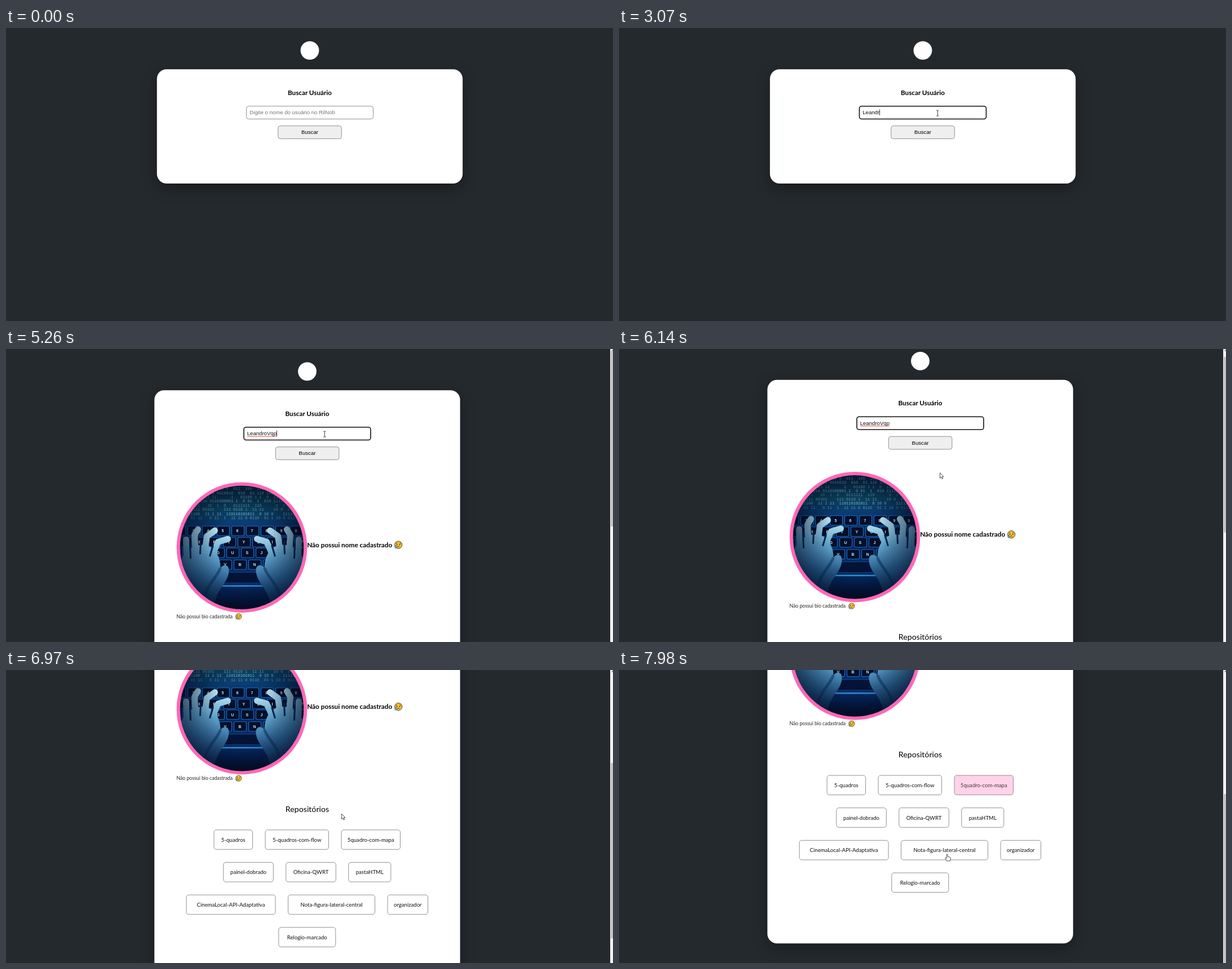
An HTML page that plays this animation: 1077 px wide and 520 px high, repeating every 8000 ms.

```html
<!DOCTYPE html>
<html lang="pt-BR">
<head>
<meta charset="utf-8">
<title>Buscar Usuário</title>
<style>
  html, body { margin: 0; width: 100%; height: 100%; overflow: hidden; background: #24292d; }
  svg { display: block; }
  text { font-family: Lato, "Open Sans", sans-serif; white-space: pre; }
  .ui { font-family: "Liberation Sans", Arial, sans-serif; font-size: 9.62px; }
  .code { font: 7px "Liberation Mono", monospace; fill: #a4e6f5; }
  .key { font: bold 7px "Liberation Sans", sans-serif; fill: #bfe9ff; }
  #card { filter: drop-shadow(0 8px 12px rgba(0, 0, 0, .32)); }
</style>
</head>
<body>
<svg id="stage" width="1077" height="520" viewBox="0 0 1077 520">
  <defs>
    <clipPath id="round"><circle r="110.5"/></clipPath>
    <linearGradient id="night" x2="0" y2="1">
      <stop offset="0" stop-color="#072c42"/><stop offset=".2" stop-color="#0d4a68"/>
      <stop offset=".32" stop-color="#0a3a72"/><stop offset=".5" stop-color="#061f50"/>
      <stop offset=".8" stop-color="#07306f"/><stop offset="1" stop-color="#020a25"/>
    </linearGradient>
    <radialGradient id="edge">
      <stop offset=".45" stop-color="#010a20" stop-opacity="0"/><stop offset="1" stop-color="#010a20" stop-opacity=".6"/>
    </radialGradient>
    <linearGradient id="skin" gradientUnits="userSpaceOnUse" x1="-50" y1="-36" x2="-80" y2="100">
      <stop offset="0" stop-color="#c2ebf6"/><stop offset=".35" stop-color="#5e9fc6"/>
      <stop offset=".65" stop-color="#2f6a9c"/><stop offset="1" stop-color="#0a2c58"/>
    </linearGradient>
    <g id="hand" fill="url(#skin)">
      <path d="M-112 34C-104 4 -84 -8 -62 -4C-46 2 -38 18 -38 36C-28 26 -20 34 -24 48C-28 66 -46 74 -50 108L-100 108Z"/>
      <g stroke="url(#skin)" stroke-width="11" stroke-linecap="round" stroke-linejoin="round" fill="none">
        <path d="M-98 22L-99 -14M-82 10L-84 -22L-78 -32M-66 8L-62 -20L-48 -30M-52 12L-42 -10L-25 -15"/>
      </g>
      <path d="M-91 20L-92 -8M-74 12L-73 -12M-57 16L-51 -4" stroke="#072650" stroke-width="3" fill="none"/>
      <path d="M-38 36C-44 54 -62 64 -66 90" stroke="#0c3768" stroke-width="5" opacity=".6" fill="none"/>
    </g>
  </defs>

  <g id="page">
    <circle cx="539" cy="39.8" r="16.4" fill="#fff"/>
    <rect id="card" x="267.8" y="73.3" width="542.4" rx="17" fill="#fff"/>
    <g id="form">
      <rect id="field" x="426.5" y="138.7" width="225" height="22.8" rx="4" fill="#fff"/>
      <text id="typed" class="ui" x="432.2" y="153.2"></text>
      <path id="spell" d="M432.5 155.2H484.5" stroke="#e8322e" stroke-width=".9"/>
      <path id="caret" d="M0 144.5V155" stroke="#000" stroke-width=".8"/>
      <rect id="button" x="482.8" y="173.7" width="112.6" height="22.8" rx="4" stroke="#858585" stroke-width=".9"/>
    </g>
    <g id="result">
      <g id="photo" transform="translate(423 352.2)"></g>
    </g>
  </g>

  <g id="bar">
    <rect x="1072" width="5" height="520" fill="#f1f1f1"/>
    <path d="M1074 3.5L1077 .5V3.5Z" fill="#777"/>
    <rect id="thumb" x="1073" width="4" height="311.5" fill="#c1c1c1"/>
  </g>
  <g id="mouse" stroke-linejoin="round">
    <path id="arrow" d="M0 0V9.4L2.2 7.4L3.7 10.8L5.1 10.2L3.6 6.9H6.4Z" fill="#fff" stroke="#222" stroke-width=".8"/>
    <path id="beam" d="M-2.2 -4.8H-.6L0 -4.3L.6 -4.8H2.2M0 -4.3V4.5M-2.2 5H-.6L0 4.5L.6 5H2.2" fill="none" stroke="#222" stroke-width=".9"/>
    <path id="pointer" d="M-1 1Q0 -.6 1 1V5L5.2 6Q6.3 6.4 6 8L5 12.6H-.6L-3.6 8.2Q-3.6 6.6 -2.4 7L-1 8.2Z" fill="#fff" stroke="#222" stroke-width=".8"/>
  </g>
</svg>
<script>
const LOOP = 8000, FOUND = 5060, FOCUS = 1130;
const USER = "LeandroVqp", HINT = "Digite o nome do usuário no RilNob";
const KEYS = [2190, 2540, 2620, 2720, 2810, 3070, 3200, 3600, 4000, 4070];
const $ = id => document.getElementById(id);

function add(parent, tag, attrs, text = "") {
  const el = document.createElementNS("http://www.w3.org/2000/svg", tag);
  for (const k in attrs) el.setAttribute(k, attrs[k]);
  el.textContent = text;
  parent.append(el);
  return el;
}
const set = (id, attrs) => { for (const k in attrs) $(id).setAttribute(k, attrs[k]); };
const show = (id, on) => set(id, { visibility: on ? "inherit" : "hidden" });

// y is the middle of the capital letters
const label = (parent, x, y, size, text, attrs = {}) =>
  add(parent, "text", { x, y: y + size * .36, "font-size": size, ...attrs }, text);
const middle = { "text-anchor": "middle" };

function sadFace(x, y, r) {
  const g = add($("result"), "g", { transform: `translate(${x} ${y}) scale(${r / 7})` });
  add(g, "circle", { r: 6.6, fill: "#fcc13b", stroke: "#3a2b14", "stroke-width": .9 });
  add(g, "path", { d: "M-4.4 -2.2L-2 -3.6M4.4 -2.2L2 -3.6M-2.2 3.6Q0 1.4 2.2 3.6",
    fill: "none", stroke: "#3a2b14", "stroke-width": 1 });
  for (const cx of [-2.5, 2.5]) add(g, "circle", { cx, cy: -.4, r: 1, fill: "#3a2b14" });
  add(g, "path", { d: "M-4.6 1Q-8 5.2 -4.6 6.2Q-1.4 5.2 -4.6 1Z", fill: "#5bb8f0", stroke: "#1d4b70", "stroke-width": .7 });
}

function drawPhoto() {
  const photo = $("photo");
  const g = add(photo, "g", { "clip-path": "url(#round)" });
  add(g, "rect", { x: -112, y: -112, width: 224, height: 224, fill: "url(#night)" });
  let seed = 7;
  const rand = () => (seed = seed * 16807 % 2147483647) / 2147483647;
  for (let row = 0; row < 8; row++) {
    let s = "";
    for (let i = 0; i < 54; i++) s += rand() < .38 ? " " : rand() < .5 ? "0" : "1";
    add(g, "text", { class: "code", x: -112, y: -102 + row * 7.4, opacity: .5 + rand() * .4 }, s);
  }
  // Keyboard rows: letters, left edge, top
  const rows = [["234567890D", -122, -38], ["WERTYUIOPA", -111, -18], ["SDFGUSJKLH", -131, 1], ["XCVVBNNMMZ", -118, 22]];
  for (const [line, left, y] of rows) {
    [...line].forEach((c, i) => {
      const x = left + i * 26;
      add(g, "rect", { x, y, width: 22, height: 17, rx: 2.5, fill: "#030f2a", stroke: "#1c6fc0", "stroke-width": 1.1 });
      add(g, "text", { class: "key", x: x + 8, y: y + 11 }, c);
    });
  }
  add(g, "rect", { x: -62, y: 44, width: 124, height: 19, rx: 2, fill: "#041337", stroke: "#0f4f9c" });
  add(g, "rect", { x: -66, y: 67, width: 132, height: 2.5, fill: "#3fa8f5" });
  add(g, "use", { href: "#hand" });
  add(g, "use", { href: "#hand", transform: "translate(2 0) scale(-1 1)" });
  add(g, "circle", { r: 112, fill: "url(#edge)" });
  add(photo, "circle", { r: 112.8, fill: "none", stroke: "#ff69b4", "stroke-width": 6 });
}

// Each row is centred: name and box width
const REPOS = [
  [["5-quadros", 68.5], ["5-quadros-com-flow", 112.5], ["5quadro-com-mapa", 104.5]],
  [["painel-dobrado", 88.5], ["Oficina-QWRT", 88.5], ["pastaHTML", 75]],
  [["CinemaLocal-API-Adaptativa", 158], ["Nota-figura-lateral-central", 154], ["organizador", 71.5]],
  [["Relogio-marcado", 101]]
];
let hotBox, hotText;

function drawPage() {
  label($("page"), 539, 114.4, 11.7, "Buscar Usuário", { ...middle, "font-weight": 700 });
  add($("form"), "text", { class: "ui", x: 539, y: 188, ...middle }, "Buscar");
  drawPhoto();
  const result = $("result");
  label(result, 538.7, 347.6, 11.8, "Não possui nome cadastrado", { "font-weight": 700 });
  sadFace(700.7, 347.6, 7);
  label(result, 307, 474.6, 8.7, "Não possui bio cadastrada", { fill: "#222" });
  sadFace(417.3, 474.6, 5.5);
  label(result, 539, 529.6, 14.2, "Repositórios", middle);
  REPOS.forEach((row, r) => {
    const gap = 22.5, y = 566.3 + r * 57.67;
    let x = 538.8 - (row.reduce((sum, b) => sum + b[1] + gap, -gap)) / 2;
    row.forEach(([name, width], i) => {
      const box = add(result, "rect", { x, y, width, height: 34.6, rx: 4.2, fill: "#fff", stroke: "#858585", "stroke-width": .9 });
      const text = label(result, x + width / 2, y + 17.4, 9.6, name, { ...middle, fill: "#111" });
      if (!r && i === 2) [hotBox, hotText] = [box, text];
      x += width + gap;
    });
  });
}

// Linear track through [time, ...values]
function track(keys, t) {
  if (t <= keys[0][0]) return keys[0].slice(1);
  for (let i = 1; i < keys.length; i++) {
    const a = keys[i - 1], b = keys[i];
    if (t < b[0]) return b.slice(1).map((v, j) => a[j + 1] + (v - a[j + 1]) * (t - a[0]) / (b[0] - a[0]));
  }
  return keys[keys.length - 1].slice(1);
}
const SCROLL = [[6100, 0], [6135, 18.5], [6200, 18.5], [6400, 169.5], [6480, 169.5], [6610, 226], [6740, 226],
  [6900, 282.5], [7040, 282.5], [7180, 339], [7240, 339], [7400, 379.3]];
const MOUSE = [[860, 563, 161], [940, 565, 155], [1060, 565.3, 151], [5660, 565.3, 151], [6140, 569.5, 219.7],
  [6420, 583, 236.7], [6970, 595.5, 255.2], [7320, 604, 248], [7480, 622, 219], [7640, 632, 206],
  [7770, 612, 224], [7860, 598, 258], [7980, 582.3, 326.3]];
const HOT = [[7480, 0], [7750, 1], [7770, 1], [8070, 0]];

function mousePos(t) {
  if (t >= 860) return track(MOUSE, t);
  const k = 1 - (1 - (t - 70) / 790) ** 2;
  return [938 - 375 * k, 469 - 308 * k];
}

function caretOn(t) {
  if (t < FOCUS) return false;
  const start = [FOCUS, ...KEYS].filter(k => k <= t).pop();
  return Math.floor((t - start) / 530) % 2 === 0;
}

function draw() {
  const t = performance.now() % LOOP;
  const found = t >= FOUND, focus = t >= FOCUS;
  const [scroll] = track(SCROLL, t);
  set("page", { transform: `translate(${found ? -4.5 : 0} ${-scroll})` });
  set("card", { height: found ? 791.2 : 202.7 });
  for (const id of ["result", "bar", "spell"]) show(id, found);
  set("thumb", { y: 3.6 + scroll * .571 });

  const count = KEYS.filter(k => k <= t).length;
  $("typed").textContent = count ? USER.slice(0, count) : HINT;
  set("typed", { fill: count ? "#111" : "#757575" });
  set("field", { stroke: focus ? "#101010" : "#858585", "stroke-width": focus ? 1.6 : .9 });
  show("caret", caretOn(t));
  const end = count ? $("typed").getComputedTextLength() : 0;
  set("caret", { transform: `translate(${432.6 + end} 0)` });

  const [x, y] = mousePos(t);
  const overButton = t < 860 && x < 596 && y > 173 && y < 197;
  set("button", { fill: overButton ? "#fdd1ea" : "#efefef" });
  const [hot] = track(HOT, t);
  hotBox.setAttribute("fill", `rgb(255 ${255 - 150 * hot} ${255 - 75 * hot})`);
  hotText.setAttribute("opacity", 1 - .7 * hot);

  const beam = t >= 860 && t < 5720;
  const pointer = overButton || (t >= 7480 && t < 7770) || t >= 7955;
  show("mouse", t >= 70);
  show("beam", beam);
  show("pointer", pointer);
  show("arrow", !beam && !pointer);
  set("mouse", { transform: `translate(${x} ${y})` });
  requestAnimationFrame(draw);
}
drawPage();
draw();
</script>
</body>
</html>
```
